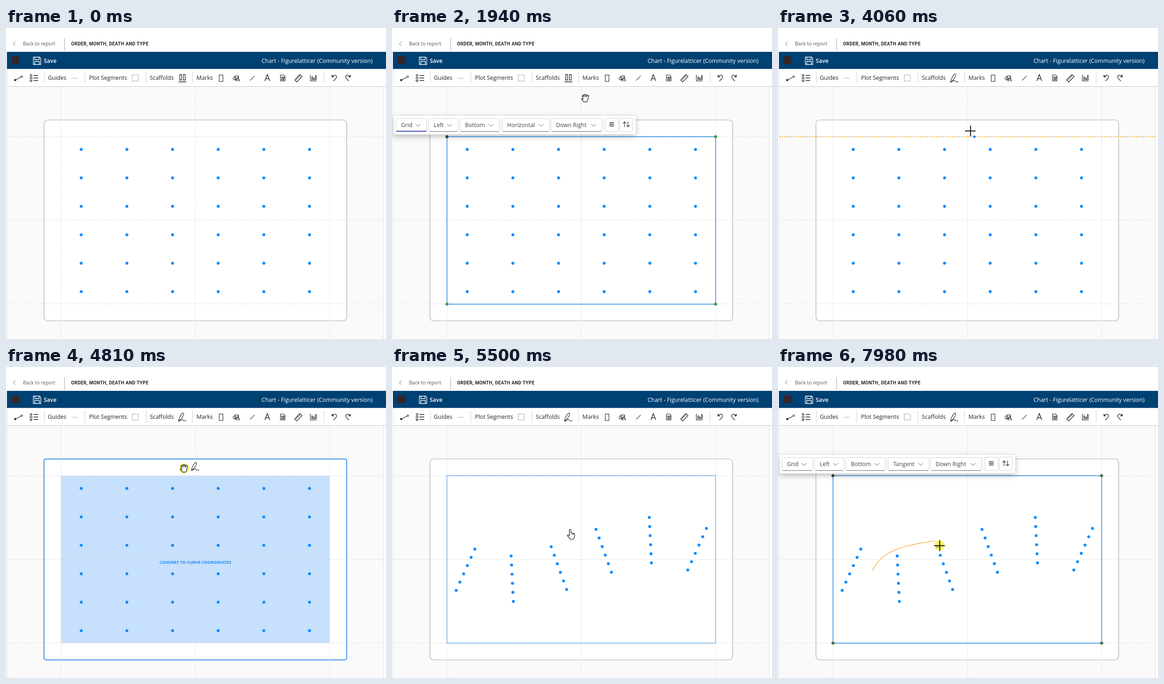
An HTML page for the animation above (8 s loop, 826x678 px).

```html
<!DOCTYPE html>
<html lang="en">
<head>
<meta charset="utf-8">
<title>Chart editor</title>
<style>
  html, body { margin: 0; width: 100%; height: 100%; overflow: hidden; background: #fff; }
  svg { display: block; font: 12.4px "Open Sans", "Noto Sans", sans-serif; }
  .ico { fill: none; stroke: #222; stroke-width: 1.1; }
  .sep { stroke: #d2d2d2; }
  .guide { stroke: #dcdcdc; stroke-dasharray: 3 2; }
  .snap { stroke: #f3a63a; stroke-width: 1.3; stroke-dasharray: 3 2; }
  .hand { fill: #fff; stroke: #111; stroke-width: 1.2; stroke-linejoin: round; }
  .panel > .back { fill: #fff; filter: drop-shadow(0 5px 7px rgba(0,0,0,.2)) drop-shadow(0 0 2px rgba(0,0,0,.12)); }
  .panel text { fill: #424242; }
  .box { fill: #fff; stroke: #d1d1d1; }
</style>
</head>
<body>
<svg id="stage" width="826" height="678" viewBox="0 0 826 678" xmlns="http://www.w3.org/2000/svg">
  <defs>
    <path id="scribble" class="ico" stroke-width="1.4" d="M-8 9C-8 4-3-6 1-9C4-10 4-6 2-3C0 2-5 6-8 9C-3 7-1 4 1 5C3 6 1 8 4 8C6 8 7 7 9 8"/>
  </defs>
  <rect width="826" height="678" fill="#fff"/>

  <!-- canvas -->
  <rect x="2" y="127" width="818" height="551" fill="#fafafa"/>
  <path d="M2.5 89V678M820.5 128V678" stroke="#dcdcdc"/>
  <rect id="chart" x="82.5" y="200.5" width="658" height="438" fill="#fff"/>
  <rect id="drop" x="119.5" y="237" width="584" height="365" fill="#c7e0fb"/>
  <g id="guides"></g>
  <path id="snapH" class="snap" d="M3 237H820"/>
  <path id="snapV" class="snap" d="M411.5 128V678"/>
  <g id="dots" fill="#118dff"></g>
  <text id="dropText" x="411.5" y="428.5" text-anchor="middle" font-size="9.1" font-weight="700" fill="#1f8af5">CONVERT TO CURVE COORDINATES</text>
  <rect id="frame" x="119.5" y="237" width="584" height="365" fill="none" stroke="#2f8deb"/>
  <path id="stroke" fill="none" stroke="#f5a52c" stroke-width="1.2"/>
  <g id="handles">
    <circle cx="119.5" cy="237" r="3.3" style="fill:#39453a"/>
    <circle cx="703.5" cy="237" r="3.3"/>
    <circle cx="119.5" cy="602" r="3.3"/>
    <circle cx="703.5" cy="602" r="3.3"/>
  </g>
  <g id="tools">
    <rect x="636" y="239" width="31" height="30" fill="#efefef"/>
    <path id="spiral" fill="none" stroke="#111" stroke-width="1.5"/>
    <rect id="pencilBox" x="671.5" y="239" width="30.5" height="30"/>
    <path transform="translate(686.5 254)" fill="#111" d="M-10.5 10.5L-8.5 4 3.5-7.5 8-3-4 8.500ZM4.600-8.600L6.500-10.200Q8-11 9.500-9.500T10.700-6L9-4.200Z"/>
  </g>
  <g id="panels"></g>

  <!-- page header -->
  <path d="M20.500 29.500L16 34L20.500 38.500" fill="none" stroke="#666"/>
  <text x="37" y="38" font-size="10.600" fill="#555">Back to report</text>
  <path d="M127.500 22V50" stroke="#a8a8a8"/>
  <text x="141.500" y="37.500" font-size="10" font-weight="700" letter-spacing=".35" fill="#252423" style="font-family:Roboto,Inter,sans-serif">ORDER, MONTH, DEATH AND TYPE</text>
  <rect x="2" y="52" width="824" height="37.500" fill="#004173"/>
  <rect x="12" y="62" width="17" height="17" fill="#33262a"/>
  <path d="M59.500 63.500H73L75.500 66V79.500H59.500ZM62.500 63.500V69H72V63.500M62.500 79V73H72.500V79" fill="none" stroke="#fff" stroke-width="1.300"/>
  <text x="82" y="75.500" font-weight="600" fill="#fff">Save</text>
  <text x="555.500" y="75.500" fill="#fff">Chart - Figurelatticer (Community version)</text>

  <!-- toolbar -->
  <rect x="3" y="89.500" width="823" height="37.500" fill="#fff"/>
  <path d="M2 127.500H826" stroke="#c4c4c4"/>
  <path class="sep" d="M83.500 95V121M171.500 95V121M304.500 95V121M405.500 95V121M691.500 95V121"/>
  <g fill="#252423">
    <text x="91" y="112.500">Guides</text>
    <text x="180.500" y="112.500">Plot Segments</text>
    <text x="312.500" y="112.500">Scaffolds</text>
    <text x="414" y="112.500">Marks</text>
  </g>
  <g class="ico">
    <path d="M21.500 113L32.500 107"/>
    <circle cx="20" cy="113.500" r="1.800" fill="#222"/><circle cx="34.300" cy="106" r="1.800"/>
    <path d="M60 103.500H70M60 109H70M60 114.500H70" stroke-width="1.400"/>
    <circle cx="54.500" cy="103" r="2"/><path d="M52.500 107.500H56.500V111H52.500ZM52 114H57L54.500 117.500Z"/>
    <path d="M143 109.500H156" stroke="#888" stroke-dasharray="2 1"/>
    <rect x="274.500" y="102.500" width="13" height="13" stroke="#555" stroke-dasharray="1 1.200"/>
    <path id="bars" d="M377.500 101.500H381.500V113.500H377.500ZM385.500 101.500H389.500V113.500H385.500ZM375 117.500H392" stroke-width="1.300"/>
    <use id="pen" href="#scribble" x="383" y="109.500"/>
    <rect x="463.500" y="102.500" width="8" height="14"/>
    <rect x="497.500" y="104.500" width="8" height="7"/><circle cx="497" cy="110" r="3.300"/><path d="M504 107L508 115H499.500Z"/>
    <path d="M530.500 114.500L540.500 104.500" stroke="#444"/>
    <path d="M562.500 115.500L568 101.500L573.500 115.500M564.500 110.500H571.500" stroke-width="1.400"/>
    <path d="M596.500 102.500H603.500L606.500 105.500V115.500H596.500Z"/>
    <circle cx="600" cy="108" r="1.500"/><path d="M602 107H605V110H602ZM599 111.500H604V113.500H599Z"/>
    <path d="M627.500 113.500L639 101.500L643.500 106L632 117.500ZM631 110L633 112M634 107L636 109M637 104L639 106" stroke-width="1.300"/>
    <path d="M661.500 102V115.500H675M664.500 113V106.500H666.500V113ZM668.500 113V109H670.500V113ZM672.500 113V103.500H674.500V113Z"/>
    <path d="M708.500 102V106.500H713M708.800 106.300C712 101.500 718.500 102 718.500 107C718.500 110 715 112.500 711.500 115.500" stroke-width="1.300"/>
    <path d="M748.500 102V106.500H744M748.200 106.300C745 101.500 738.500 102 738.500 107C738.500 110 742 112.500 745.500 115.500" stroke-width="1.300"/>
  </g>

  <!-- pointer -->
  <circle id="snapDot" r="2.800" fill="#118dff"/>
  <g id="cursor">
    <circle id="press" r="11" fill="#fbee1e" opacity=".68"/>
    <g id="grab">
      <path class="hand" d="M-4.500 2.500L-6.500-4.200q-.2-1.600 1.100-1.700 1 0 1.500 1.400L-3-2.500-3.700-6.500q0-1.700 1.300-1.800t1.700 1.500L0-3 .6-7q.3-1.600 1.600-1.500t1.300 1.900L3-2.500 4.800-5.700q.9-1.300 2-.6t.6 2L5.800 2.500Q5.300 6 3.500 8.200H-3.200Q-4.500 5.800-7.600 3.200q-1-1.200-.2-2t3.300 1.300Z"/>
    </g>
    <g id="point">
      <path class="hand" d="M-3.500 3V-9.500a1.700 1.700 0 0 1 3.400 0V-3.500l6 1.300q2.300.6 2.200 3l-.6 4.500q-.5 3-2.200 5.200H-1.500Q-3 7.500-7.500 3.200q-1-2 1-2.200 1.500 0 3 2Z"/>
      <path d="M2.500-2.800V.5M5.300-2.200V.8" stroke="#111"/>
    </g>
    <path id="cross" d="M-11.500 .5H11.500M.5-11V12" stroke="#111" stroke-width="2"/>
    <use id="ghost" href="#scribble" x="24" y="-4"/>
  </g>
</svg>
<script>
const LOOP = 8000;
const $ = id => document.getElementById(id);
const show = (id, on) => { $(id).style.display = on ? "" : "none"; };
const set = (id, attrs) => { for (const k in attrs) $(id).setAttribute(k, attrs[k]); };
const lerp = (a, b, k) => a + (b - a) * k;
const clamp = v => Math.max(0, Math.min(1, v));
const within = (t, a, b) => t >= a && t < b;

// key moments
const SELECT = 830, DESELECT = 2300, PICK = 3660, TOOL_OFF = 4410, GRAB = 4610, DROP = 5230,
      RESELECT = 6100, PENCIL = 6515, SKETCH = 6950, DRAW = 7770, DRAW_END = 7980;

const clicks = [[780, 880], [2230, 2330], [2880, 2980], [3520, 3640], [GRAB, DROP],
                [6060, 6150], [6440, 6520], [DRAW, LOOP]];

const route = [
  [70, 760, 660], [830, 470, 255], [1740, 470, 250], [1940, 420, 153], [2340, 420, 153],
  [2480, 636, 150], [2550, 636, 150], [2690, 392, 127], [2830, 385, 112], [3000, 385, 112],
  [3500, 430, 245], [3680, 430, 245], [4060, 418, 224], [4250, 400, 190], [4410, 383, 106],
  [4610, 383, 106], [4810, 387, 221], [5090, 388, 330], [5230, 389, 365], [6150, 389, 365],
  [6400, 687, 255], [6520, 687, 257], [6590, 687, 283], [6880, 670, 300], [7630, 195, 500],
  [7700, 195, 500], [7770, 213, 455]
];

// freehand stroke, as a cubic
const bez = [[205, 445], [222, 407], [257, 390], [343, 379]];
const onStroke = s => [0, 1].map(i => {
  const r = 1 - s;
  return r * r * r * bez[0][i] + 3 * r * r * s * bez[1][i] + 3 * r * s * s * bez[2][i] + s * s * s * bez[3][i];
});

function cursorAt(t) {
  if (t >= DRAW) {
    const [x, y] = onStroke(clamp((t - DRAW) / (DRAW_END - DRAW)));
    return [x + 8, y + 10];
  }
  const n = route.findIndex(k => k[0] > t);
  if (n === 0) return route[0].slice(1);
  const a = route[(n < 0 ? route.length : n) - 1], b = n < 0 ? a : route[n];
  const p = b === a ? 0 : (t - a[0]) / (b[0] - a[0]);
  const k = p * p * (3 - 2 * p);
  return [lerp(a[1], b[1], k), lerp(a[2], b[2], k)];
}

// guides
$("guides").innerHTML =
  [119.5, 411.5, 703.5].map(x => `<path class="guide" d="M${x} 128V678"/>`).join("") +
  [237, 419.5, 601.5].map(y => `<path class="guide" d="M3 ${y}H820"/>`).join("");

// data points: a grid, or six slanted rows [x1, y1, x2, y2]
const rows = [[180, 397, 139.5, 487], [259, 412, 263.8, 511], [346, 391.7, 379.5, 485],
              [443.5, 354, 477, 447.5], [559.3, 328, 564, 427], [683.5, 352, 643, 442.5]];
const dots = [];
for (let i = 0; i < 6; i++) for (let j = 0; j < 6; j++) {
  const el = document.createElementNS("http://www.w3.org/2000/svg", "circle");
  const [x1, y1, x2, y2] = rows[i];
  el.setAttribute("r", 3.2);
  $("dots").append(el);
  dots.push({ el, grid: [163.5 + 99.25 * i, 264.8 + 62 * j], bent: [lerp(x1, x2, j / 5), lerp(y1, y2, j / 5)] });
}

// spiral button
let coil = "";
for (let a = 0; a <= 23; a += .25) {
  const r = .5 + a * .44;
  coil += (a ? "L" : "M") + (651.5 + r * Math.cos(a)).toFixed(1) + " " + (254 + r * Math.sin(a)).toFixed(1);
}
set("spiral", { d: coil });

// floating option panels
const dropdown = ([label, x, w]) => `
  <rect class="box" x="${x + .5}" y="197.500" width="${w - 1}" height="28" rx="3.500"/>
  <path d="M${x + 2} 225.700H${x + w - 2}" stroke="#666"/>
  <text x="${x + 11.5}" y="216">${label}</text>
  <path d="M${x + w - 24} 209.500l5 5 5-5" fill="none" stroke="#555"/>`;

const panel = (id, third, w3) => {
  const x4 = 239 + w3 + 2, x5 = x4 + 118;
  const lists = [["Grid", 8, 68], ["Left", 79, 65], ["Bottom", 147, 87], [third, 239, w3], ["Down Right", x4, 112]];
  return `<g id="${id}" class="panel">
    <rect class="back" x="3" y="191.500" width="${x5 + 64}" height="40.500" rx="2"/>
    <path d="M236.500 199V225M${x5 - 3.5} 199V225" stroke="#e4e4e4"/>
    ${lists.map(dropdown).join("")}
    <rect class="focus" y="224" height="2"/>
    <rect class="box" x="${x5 + .5}" y="196.500" width="29" height="29" rx="3.500"/>
    <rect class="box" x="${x5 + 31.5}" y="196.500" width="29" height="29" rx="3.500"/>
    <path d="M${x5 + 9.5} 206.500h10m-10 3.500h10m-10 3.500h10" stroke="#222" stroke-width="1.600"/>
    <path d="M${x5 + 42.5} 216V204.500m-3.500 3.500l3.500-3.500 3.500 3.500M${x5 + 50} 204v11.500m-3.500-3.500l3.500 3.500 3.500-3.500" fill="none" stroke="#333" stroke-width="1.200"/>
  </g>`;
};
$("panels").innerHTML = panel("gridPanel", "Horizontal", 104) + panel("curvePanel", "Tangent", 90);

function drawPanel(id, t, opened, focused, color) {
  const rest = Math.pow(1 - clamp((t - opened) / 367), 7.6);
  const w = 66 * (1 - rest), line = $(id).querySelector(".focus");
  set(id, { transform: `translate(0 ${(20 * rest).toFixed(2)})` });
  line.setAttribute("x", 42 - w / 2);
  line.setAttribute("width", focused ? w : 0);
  line.setAttribute("fill", color);
}

function render(t) {
  const [x, y] = cursorAt(t);
  const bent = t >= DROP, dragging = within(t, GRAB, DROP);
  const first = within(t, SELECT, DESELECT), second = t >= RESELECT, selected = first || second;
  const inPlot = x > 119 && x < 704 && y > 237 && y < 602;
  const overCanvas = y > 128;
  const placing = within(t, PICK, TOOL_OFF) && overCanvas;

  set("chart", dragging
    ? { rx: 4, stroke: "#3a8fe6", "stroke-width": 2 }
    : { rx: 8, stroke: "#aaa", "stroke-width": 1.2 });
  show("drop", dragging);
  show("dropText", dragging);

  for (const d of dots) {
    const [cx, cy] = bent ? d.bent : d.grid;
    d.el.setAttribute("cx", cx);
    d.el.setAttribute("cy", cy);
  }

  show("frame", t >= 70 && (selected || (inPlot && !dragging && !placing)));
  set("frame", { "stroke-width": selected ? 1.6 : 1 });
  show("handles", selected);
  set("handles", { fill: bent ? "#4a7339" : "#449a3f" });

  show("gridPanel", first);
  show("curvePanel", second);
  if (first) drawPanel("gridPanel", t, SELECT, true, "#4f56c4");
  if (second) drawPanel("curvePanel", t, t < PENCIL ? RESELECT : PENCIL, t < SKETCH, "#2f7fd0");

  show("tools", second && t < SKETCH);
  const active = t >= 6400;
  set("pencilBox", { fill: active ? "#e5f0fb" : "#efefef", stroke: active ? "#2f8deb" : "none" });

  show("bars", t < PICK);
  show("pen", t >= PICK);

  // snapping while placing
  const px = x + 9, py = y + 13;
  const snapX = placing && Math.abs(px - 411.5) < 10, snapY = placing && Math.abs(py - 237) < 10;
  show("snapH", snapY);
  show("snapV", snapX);
  show("snapDot", placing);
  set("snapDot", { cx: snapX ? 411.5 : px, cy: snapY ? 237 : py });

  // freehand stroke
  show("stroke", t >= DRAW);
  if (t >= DRAW) {
    const s = clamp((t - DRAW) / (DRAW_END - DRAW));
    let d = "M" + bez[0];
    for (let i = 1; i <= 16; i++) d += "L" + onStroke(s * i / 16).map(v => v.toFixed(1));
    set("stroke", { d });
  }

  // pointer
  const cross = placing || t >= SKETCH;
  const pointing = !cross && !dragging && (!overCanvas || inPlot);
  show("cursor", t >= 70);
  set("cursor", { transform: `translate(${x.toFixed(2)} ${y.toFixed(2)})` });
  show("press", clicks.some(([a, b]) => within(t, a, b)));
  show("cross", cross);
  show("point", pointing);
  show("grab", !cross && !pointing);
  show("ghost", dragging);
}

const start = performance.now();
function tick() {
  render((performance.now() - start) % LOOP);
  requestAnimationFrame(tick);
}
tick();
</script>
</body>
</html>
```
